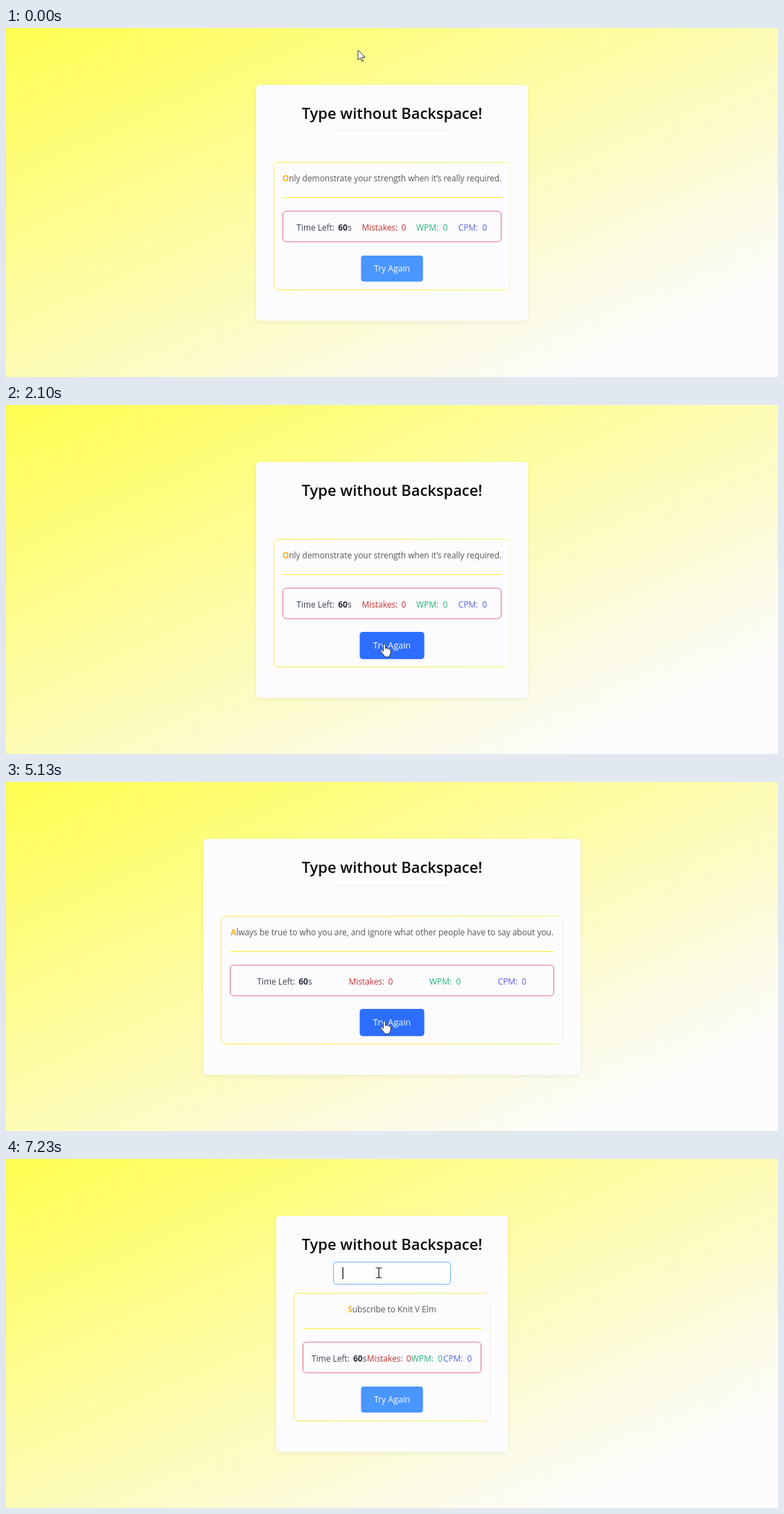
An HTML page with a canvas for the animation above (8000 ms loop, 1114x503 px).

```html
<!DOCTYPE html>
<html lang="en">
<head>
<meta charset="utf-8">
<title>Type without Backspace!</title>
<style>
html, body { margin: 0; width: 100%; height: 100%; overflow: hidden; }
body { background: linear-gradient(to bottom right, #fffe50, #fdfcb0 48%, #fcfbe2 72%, #fcfcfe 88%); }
canvas { display: block; }
</style>
</head>
<body>
<canvas width="1114" height="503"></canvas>
<script>
const ctx = document.querySelector('canvas').getContext('2d');
const LOOP = 8000, MID = 557;

// Start time, quote and half the width of the inner column.
const quotes = [
  [0, 'Only demonstrate your strength when it’s really required.', 158],
  [3300, 'Always be true to who you are, and ignore what other people have to say about you.', 234],
  [6000, 'Subscribe to Knit V Elm', 129],
];

// Label, colour, offset of the value, width of the item.
const stats = [
  ['Time Left:', '#3b424e', 60, 79.5],
  ['Mistakes:', '#c9302f', 57, 64],
  ['WPM:', '#25b475', 38.5, 46],
  ['CPM:', '#5560e8', 34.5, 42],
];

const arrow = new Path2D('M0 0V14L3.3 11 5.5 16 7.7 15 5.6 10.2H10.2Z');
const hand = new Path2D('M-1.5 10V.9a1.5 1.5 0 0 1 3 0V6l1-.6a1.4 1.4 0 0 1 2 1l.8-.3a1.3 1.3 0 0 1 1.8 1.1c1-.4 2 .3 2 1.5V12c0 2-1.8 3.5-2.2 6H.5C0 15.5-3.5 13-5.5 9.6c-.5-1.4 1-2 2-1.2z');
const beam = new Path2D('M-4.5-7H-1Q0-7 0-6Q0-7 1-7H4.5M0-6V6M-4.5 7H-1Q0 7 0 6Q0 7 1 7H4.5');
const textRows = [[110, 136], [148, 181], [208, 225], [279, 295]];

const progress = (t, from, to) => Math.min(1, Math.max(0, (t - from) / (to - from)));
const mix = (a, b, p) => a + (b - a) * p;
const easeOut = p => 1 - (1 - p) ** 2;
const easeInOut = p => p < .5 ? 2 * p * p : 1 - 2 * (1 - p) ** 2;

function text(str, x, y, color, size = 11.9, weight = 400, align = 'left') {
  ctx.font = `${weight} ${size}px "Open Sans", "Noto Sans", sans-serif`;
  ctx.fillStyle = color;
  ctx.textAlign = align;
  ctx.fillText(str, x, y);
  return ctx.measureText(str).width;
}

function box(x, y, w, h, radius, fill, stroke) {
  ctx.beginPath();
  ctx.roundRect(x, y, w, h, radius);
  if (fill) { ctx.fillStyle = fill; ctx.fill(); }
  if (stroke) { ctx.strokeStyle = stroke; ctx.stroke(); }
}

function line(x1, y1, x2, y2, color) {
  ctx.strokeStyle = color;
  ctx.beginPath();
  ctx.moveTo(x1, y1);
  ctx.lineTo(x2, y2);
  ctx.stroke();
}

function drawCard(half) {
  ctx.save();
  ctx.shadowColor = 'rgba(60,50,0,.07)';
  ctx.shadowBlur = 7;
  ctx.shadowOffsetY = 2;
  box(MID - half - 38, 82, 2 * half + 76, 340, 5, '#fcfcff');
  ctx.restore();
  text('Type without Backspace!', MID, 131, '#0a0a0a', 21.9, 600, 'center');

  const left = MID - half - 12.5, width = 2 * half + 25;
  const border = ctx.createLinearGradient(left, 0, left + width, 0);
  border.addColorStop(0, '#fde83a');
  border.addColorStop(.97, '#fbf06c');
  border.addColorStop(1, '#f3efdc');
  box(left, 193.5, width, 184, 6, null, border);
  line(MID - half, 244.5, MID + half, 244.5, '#fdee2a');
}

function drawInput(focus) {
  line(472.5, 152, 472.5, 177, '#f3f3f5');
  line(476, 148.5, 638, 148.5, '#f3f3f5');
  if (!focus) return;
  box(472.5, 148.5, 169, 32, 4, '#fdfdff', `rgba(114,176,240,${focus})`);
  ctx.fillStyle = '#111';
  ctx.fillRect(485.5, 156, 1.3, 17);
}

function drawQuote(quote) {
  ctx.font = '400 11.9px "Open Sans", "Noto Sans", sans-serif';
  const rest = ctx.measureText(quote.slice(1)).width;
  ctx.font = '700 11.9px "Open Sans", "Noto Sans", sans-serif';
  const first = ctx.measureText(quote[0]).width;
  const x = MID - (first + rest) / 2;
  text(quote[0], x, 220.5, '#fbb324', 11.9, 700);
  text(quote.slice(1), x + first, 220.5, '#555459');
}

function drawStats(half) {
  box(MID - half + .5, 264, 2 * half - 1, 44, 5, null, '#dd6a84');
  const gap = (2 * half - 26 - 231.5) / 4;
  let x = MID - half + 13 + gap / 2;
  stats.forEach(([label, color, offset, width], i) => {
    text(label, x, 291.5, color);
    if (i) text('0', x + offset, 291.5, color);
    else {
      const w = text('60', x + offset, 291.5, '#262c38', 11.9, 700);
      text('s', x + offset + w, 291.5, color);
    }
    x += width + gap;
  });
}

function drawButton(hover) {
  ctx.save();
  ctx.translate(MID, 346.7);
  ctx.scale(1 + .042 * hover, 1 + .042 * hover);
  box(-44.7, -18.8, 89.4, 37.6, 4, `rgb(${mix(74, 45, hover)},${mix(150, 110, hover)},255)`);
  text('Try Again', 0, 4.4, '#fff', 12.2, 400, 'center');
  ctx.restore();
}

function drawPointer(t) {
  const down = easeInOut(progress(t, 30, 800));
  const settle = easeOut(progress(t, 870, 1630));
  const up = easeInOut(progress(t, 6530, 6770));
  const x = mix(mix(mix(508, 524, down), 546, settle), 538, up);
  const y = mix(mix(mix(32, 269, down), 345, settle), 164, up);

  ctx.save();
  ctx.translate(x, y);
  if (textRows.some(([top, bottom]) => y >= top && y <= bottom)) {
    ctx.strokeStyle = '#111';
    ctx.lineWidth = 1.2;
    ctx.stroke(beam);
  } else {
    const shape = y >= 328 ? hand : arrow;
    ctx.fillStyle = '#fff';
    ctx.fill(shape);
    ctx.strokeStyle = '#222';
    ctx.lineWidth = .9;
    ctx.stroke(shape);
  }
  ctx.restore();
}

function draw() {
  const t = performance.now() % LOOP;
  const [, quote, half] = quotes.findLast(([start]) => t >= start);
  const hover = easeInOut(progress(t, 1270, 1470)) - easeInOut(progress(t, 6570, 6770));
  ctx.clearRect(0, 0, 1114, 503);
  ctx.lineWidth = 1;
  drawCard(half);
  drawInput(easeOut(progress(t, 6900, 7200)));
  drawQuote(quote);
  drawStats(half);
  drawButton(hover);
  drawPointer(t);
  requestAnimationFrame(draw);
}
draw();
</script>
</body>
</html>
```
